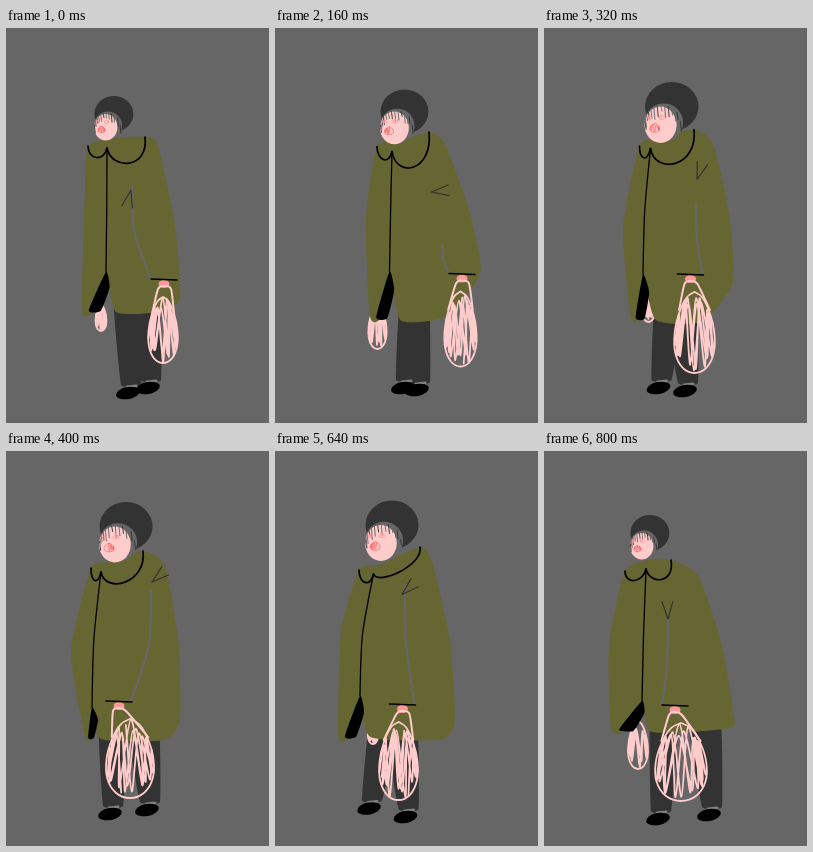
An HTML page with a canvas that plays this animation: 263 px wide and 395 px high, repeating every 0.88 s.

```html
<!DOCTYPE html>
<html>
<head>
<meta charset="utf-8">
<style>
  html, body { margin: 0; width: 100%; height: 100%; overflow: hidden; background: #666; }
  canvas { display: block; }
</style>
</head>
<body>
<canvas id="stage" width="263" height="395"></canvas>
<script>
const ctx = document.getElementById('stage').getContext('2d');
const OLIVE = '#666633', DARK = '#333333', PINK = '#ffcccc', RED = '#ff6666', GREY = '#666666', BLACK = '#000';
const STEP_MS = 80;

// Joints of the figure in each key pose; the shapes are built around them.
// head: x, y, size; collarR: x, y, depth; bag: x, bottom, radius; farBag: x, y, radius; pocket: x, y, angle.
const poses = [
  { head: [88, 68, 39], neck: [101, 120], collarL: [82, 118], collarR: [139, 109, 22],
    shoulder: [151, 115], sideR: [174, 271], hemR: [150, 284], hemM: [110, 284], hemL: [76, 282], sideL: [79, 165],
    zip: [100, 244], sleeve: [126, 158], hand: [158, 251], bag: [157, 335, 16], farBag: [95, 290, 13],
    footL: [122, 365], footR: [142, 360], pocket: [125, 162, 1.8] },
  { head: [102, 66, 42], neck: [116, 127], collarL: [98, 118], collarR: [145, 105, 24],
    shoulder: [160, 114], sideR: [207, 248], hemR: [184, 278], hemM: [123, 289], hemL: [96, 284], sideL: [89, 180],
    zip: [117, 250], sleeve: [176, 225], hand: [194, 249], bag: [194, 334, 17], farBag: [106, 304, 20],
    footL: [131, 363], footR: [143, 357], pocket: [153, 156, 1.6] },
  { head: [108, 57, 54], neck: [118, 120], collarL: [106, 119], collarR: [163, 103, 30],
    shoulder: [179, 117], sideR: [204, 240], hemR: [160, 298], hemM: [129, 296], hemL: [94, 292], sideL: [93, 200],
    zip: [112, 237], sleeve: [159, 212], hand: [180, 242], bag: [177, 343, 18], farBag: [99, 294, 24],
    footL: [125, 357], footR: [141, 367], pocket: [160, 172, -1.8] },
  { head: [93, 51, 53], neck: [95, 121], collarL: [85, 117], collarR: [137, 100, 22],
    shoulder: [159, 115], sideR: [174, 268], hemR: [158, 289], hemM: [95, 288], hemL: [79, 286], sideL: [65, 200],
    zip: [86, 256], sleeve: [145, 140], hand: [113, 250], bag: [124, 347, 26], farBag: [110, 262, 8],
    footL: [104, 363], footR: [141, 359], pocket: [146, 131, -0.7] },
  { head: [89, 43, 59], neck: [93, 124], collarL: [85, 119], collarR: [149, 88, 4],
    shoulder: [158, 103], sideR: [177, 262], hemR: [160, 298], hemM: [94, 290], hemL: [69, 289], sideL: [65, 200],
    zip: [88, 252], sleeve: [130, 122], hand: [110, 251], bag: [109, 347, 22], farBag: [105, 262, 5],
    footL: [101, 345], footR: [115, 365], pocket: [130, 121, 0] },
  { head: [91, 56, 47], neck: [104, 122], collarL: [83, 119], collarR: [141, 104, 20],
    shoulder: [156, 118], sideR: [183, 266], hemR: [178, 278], hemM: [97, 282], hemL: [58, 282], sideL: [67, 165],
    zip: [82, 238], sleeve: [130, 146], hand: [145, 255], bag: [138, 351, 20], farBag: [91, 299, 20],
    footL: [87, 370], footR: [146, 367], pocket: [124, 166, -1.5] },
  { head: [86, 64, 39], neck: [102, 118], collarL: [81, 120], collarR: [127, 109, 16],
    shoulder: [154, 124], sideR: [189, 260], hemR: [186, 277], hemM: [108, 281], hemL: [67, 278], sideL: [65, 195],
    zip: [98, 250], sleeve: [124, 165], hand: [131, 254], bag: [137, 350, 28], farBag: [94, 294, 24],
    footL: [114, 368], footR: [165, 364], pocket: [124, 168, -1.6] }
];

// Fractions are in-betweens of two neighbouring poses.
const steps = [0, 1, 1.5, 2, 2.5, 3, 3.5, 4, 4.5, 5, 6];

const mix = (p, q, t) => p.map((v, i) => v + (q[i] - v) * t);
const shift = ([x, y], dx, dy) => [x + dx, y + dy];

function random(seed) {
  const x = Math.sin(seed * 12.9898) * 43758.5453;
  return x - Math.floor(x);
}

function poseAt(position) {
  const a = poses[Math.floor(position)], b = poses[Math.ceil(position)];
  return Object.fromEntries(Object.keys(a).map(name => [name, mix(a[name], b[name], position % 1)]));
}

// Smooth path through the points.
function trace(points, closed, tension) {
  const n = points.length;
  const at = i => points[closed ? (i + n) % n : Math.max(0, Math.min(n - 1, i))];
  ctx.beginPath();
  ctx.moveTo(...points[0]);
  for (let i = 0; i < (closed ? n : n - 1); i++) {
    const [p, q, r, s] = [at(i - 1), at(i), at(i + 1), at(i + 2)];
    ctx.bezierCurveTo(
      q[0] + (r[0] - p[0]) * tension, q[1] + (r[1] - p[1]) * tension,
      r[0] - (s[0] - q[0]) * tension, r[1] - (s[1] - q[1]) * tension, ...r);
  }
}

function fill(color) {
  ctx.fillStyle = color;
  ctx.fill();
}

function stroke(color, width) {
  ctx.strokeStyle = color;
  ctx.lineWidth = width;
  ctx.stroke();
}

function shape(points, color, tension = 0.08) {
  trace(points, true, tension);
  fill(color);
}

function line(points, color, width, tension = 0) {
  trace(points, false, tension);
  stroke(color, width);
}

function curve(from, c1, c2, to, color, width) {
  ctx.beginPath();
  ctx.moveTo(...from);
  ctx.bezierCurveTo(...c1, ...c2, ...to);
  stroke(color, width);
}

function oval(x, y, rx, ry, color, angle = 0) {
  ctx.beginPath();
  ctx.ellipse(x, y, rx, ry, angle, 0, 2 * Math.PI);
  fill(color);
}

// Up-and-down pen loops inside a pear-shaped outline.
function scribble(x, y, rx, ry, turns, seed, color, width) {
  const place = (u, v) => [x + u * rx * (0.9 + 0.22 * v), y + v * ry];
  const rim = [], loops = [];
  for (let i = 0; i <= 12; i++) {
    const a = i * Math.PI / 6;
    rim.push(place(Math.sin(a), -Math.cos(a)));
  }
  for (let i = 0; i < turns; i++) {
    const u = 0.88 * Math.sin(i * 0.43 + seed) + 0.2 * (random(seed + i) - 0.5);
    const reach = Math.sqrt(Math.max(0, 1 - u * u)) * (0.65 + 0.35 * random(seed + i * 3));
    loops.push(place(u, i % 2 ? reach : -reach));
  }
  line(rim, color, width, 0.17);
  line(loops, color, width, 0.14);
}

function drawHead([x, y, size], seed) {
  const at = (u, v) => [x + u * size, y + v * size];
  oval(...at(0.51, 0.46), size * 0.5, size * 0.46, DARK);
  oval(...at(0.36, 0.76), size * 0.36, size * 0.36, GREY);
  oval(...at(0.3, 0.8), size * 0.3, size * 0.34, PINK);
  for (let i = 0; i < 16; i++) {
    const a = Math.PI * (1 + i / 15);
    const [u, v] = [0.34 + 0.33 * Math.cos(a), 0.74 + 0.3 * Math.sin(a)];
    line([at(u, v), at(u + 0.02, v + 0.08 + 0.14 * random(i + seed))], i % 3 ? GREY : DARK, 1);
  }
  scribble(...at(0.1, 0.67), size * 0.04, size * 0.03, 4, seed, '#ff9999', 0.8);
  scribble(...at(0.32, 0.66), size * 0.06, size * 0.04, 4, seed, '#ff9999', 0.8);
  scribble(...at(0.19, 0.86), size * 0.1, size * 0.08, 9, seed, RED, 0.8);
}

function drawLeg(hip, hipWidth, [x, y]) {
  shape([hip, shift(hip, hipWidth, 0), [x + 13, y - 8], [x - 7, y - 8]], DARK, 0.04);
}

function drawShoe([x, y]) {
  line([[x - 1, y - 6], [x + 8, y - 7]], '#808080', 3);
  oval(x, y, 12, 6, BLACK, -0.2);
}

function drawCoat({ neck, collarL, collarR, shoulder, sideR, hemR, hemM, hemL, sideL, zip, sleeve, hand, pocket }) {
  const hem = t => mix(hemL, hemM, t);
  const elbow = shift(mix(shoulder, sideR, 0.5), 6, 0);
  shape([collarL, shift(neck, 8, -10), collarR, shoulder, elbow, sideR, hemR, hemM, zip, hem(0.35), hemL, sideL], OLIVE, 0.1);

  const cuff = shift(hand, sleeve[0] < hand[0] ? -13 : 12, 0);
  const bend = [sleeve[0], (sleeve[1] + cuff[1]) / 2];
  curve(sleeve, bend, bend, cuff, GREY, 2.2);
  const arm = a => shift(pocket, 18 * Math.cos(pocket[2] + a), 18 * Math.sin(pocket[2] + a));
  line([arm(-0.3), pocket.slice(0, 2), arm(0.3)], DARK, 1.2);

  shape([zip, shift(mix(zip, hem(0.6), 0.4), 5, 0), hem(0.55), hem(0.2)], BLACK);
  const middle = [zip[0] + 1, (neck[1] + zip[1]) / 2];
  curve(neck, middle, middle, zip, BLACK, 1.3);
}

function drawCollar({ neck, collarL, collarR: [x, y, depth] }) {
  curve(collarL, shift(collarL, 0, 14), shift(neck, -3, 14), neck, BLACK, 1.7);
  curve(neck, shift(neck, 4, depth), [x + 4, y + depth * 1.5], [x, y], BLACK, 1.7);
}

function drawBag({ hand, bag: [x, bottom, radius] }, seed) {
  const top = hand[1] + 18, half = (bottom - top) / 2;
  oval(hand[0], hand[1] + 5, 5.5, 4, '#ff9999');
  line([shift(hand, -13, 0), shift(hand, 13, 1)], BLACK, 1.5);
  line([[x - radius * 0.7, top + 18], shift(hand, -6, 10), shift(hand, 0, 7), shift(hand, 7, 10),
    [x + radius * 0.7, top + 18]], PINK, 2, 0.12);
  scribble(x, top + half, radius, half, 30, seed, PINK, 1.8);
}

function drawWoman(pose, seed) {
  const { footL, footR, hemM, zip, farBag: [x, y, radius] } = pose;
  shape([zip, shift(hemM, 12, 0), hemM], DARK, 0);
  drawLeg([footR[0] - 20, 276], 32, footR);
  drawLeg(shift(hemM, -2, -6), 28, footL);
  drawShoe(footR);
  drawShoe(footL);
  scribble(x, y, radius * 0.45, radius, 20, seed + 50, PINK, 1.8);
  drawCoat(pose);
  drawHead(pose.head, seed);
  drawCollar(pose);
  drawBag(pose, seed);
}

ctx.lineCap = ctx.lineJoin = 'round';

function render() {
  const step = Math.floor(performance.now() / STEP_MS) % steps.length;
  ctx.fillStyle = GREY;
  ctx.fillRect(0, 0, 263, 395);
  drawWoman(poseAt(steps[step]), step + 1);
  requestAnimationFrame(render);
}
render();
</script>
</body>
</html>
```
